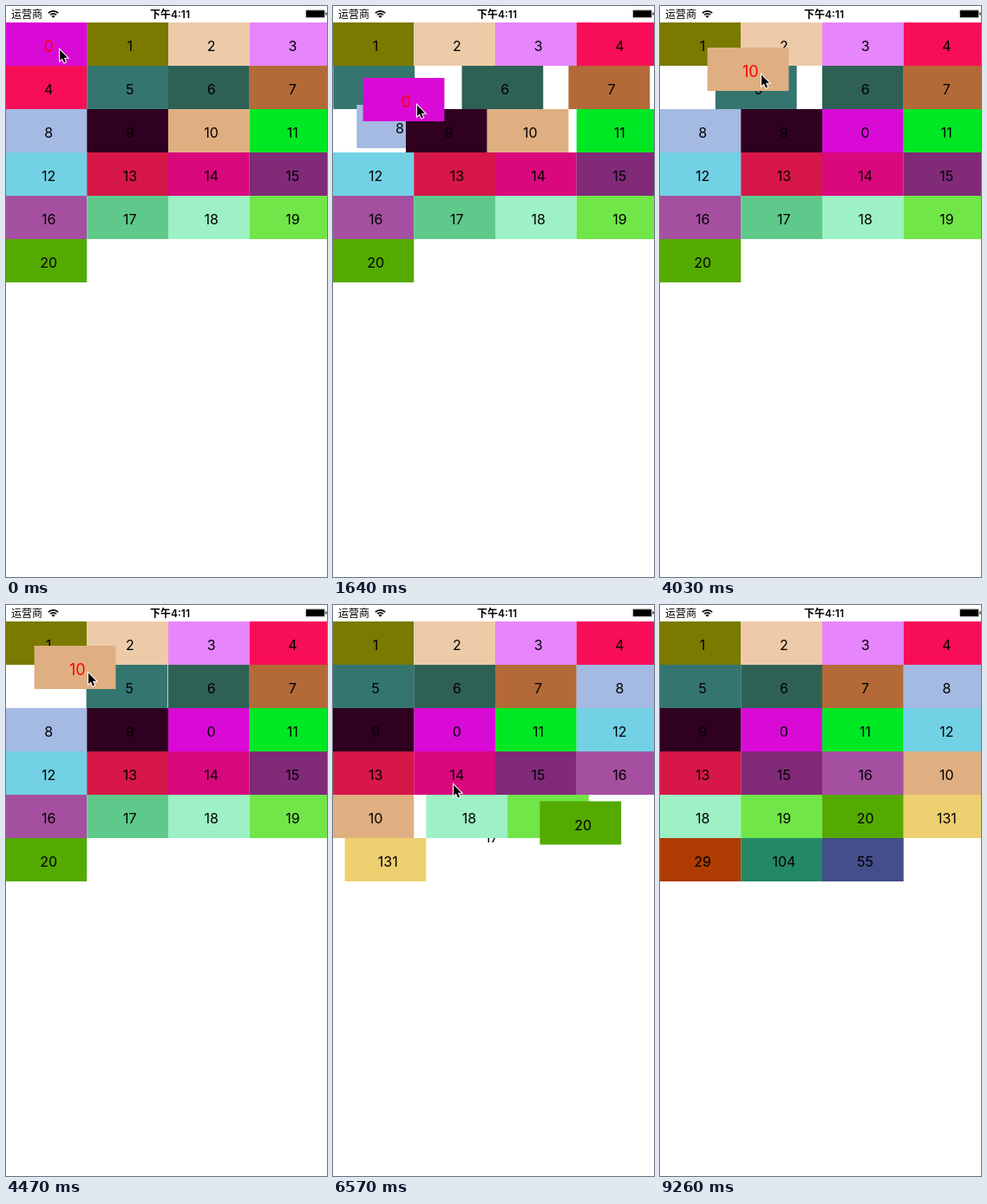
Write an HTML page with a canvas that moves like this. It is 370x659 px and loops after 9560 ms.

```html
<!DOCTYPE html>
<html lang="zh">
<head>
<meta charset="utf-8">
<style>
  html, body { margin: 0; width: 100%; height: 100%; overflow: hidden; background: #fff; }
  canvas { display: block; }
</style>
</head>
<body>
<canvas id="stage" width="370" height="659"></canvas>
<script>
const ctx = document.getElementById('stage').getContext('2d');
const LOOP = 9560, TICK = 149.3, LAST_TICK = 62;
const COLS = 4, W = 93.75, H = 50, TOP = 19, START_COUNT = 21;
const SLIDE = 300 / TICK;
const FONT = 'Inter, "Noto Sans CJK SC", "Noto Sans CJK", sans-serif';

const colors = ('#da0ad6 #7a7a00 #edcba8 #e685fc #f80e58 #34766f #2e6154 #b36a38 #a4bae2 #300020 ' +
  '#dfaf82 #00e824 #72d1e5 #d61748 #d9087d #802a78 #a54fa0 #5fc98b #9df1c4 #70e648 #55aa02 ' +
  '#edd070 #b03c04 #248864 #434e8a').split(' ');
const names = [...Array(START_COUNT).keys(), 131, 29, 104, 55];

// The hand drives everything: [tick, x, y] of the point it holds.
const hand = [
  [0, 47, 44], [4.9, 91, 222], [6.1, 97, 269], [7, 88, 308], [9.38, 233, 119], [11, 82, 108],
  [13, 146, 146], [16, 226, 143], [17, 236, 143], [22, 236, 143], [24, 70, 94], [27, 102, 73],
  [27.5, 108, 58], [28, 95, 72], [30, 80, 72], [31.2, 90, 296], [34, 84, 259], [37, 48, 231],
  [39, 48, 231], [41, 124, 235], [43, 124, 232], [44, 124, 201], [47, 124, 201], [50, 46, 189],
  [53, 46, 189], [54, 40, 185], [59, 40, 185], [62, 500, 732]
];
const drags = [{ start: 0, end: 13 }, { start: 20.95, end: 33.99 }];
const taps = [37.7, 42.5, 45.5, 50.3, 55.6, 58.3];

const clamp = v => Math.max(0, Math.min(1, v));
const ease = v => (1 - Math.cos(Math.PI * clamp(v))) / 2;
const mix = (a, b, p) => a.map((v, i) => v + (b[i] - v) * p);
const slotPos = s => [(s % COLS) * W, TOP + Math.floor(s / COLS) * H];
const slotAt = ([x, y]) => Math.floor((y - TOP) / H) * COLS + Math.floor(x / W);
const cellAt = ([x, y]) => [x - W / 2, y - H / 2];

function handAt(k) {
  const i = hand.findIndex(p => p[0] > k);
  if (i < 0) return hand[hand.length - 1].slice(1);
  const a = hand[i - 1], b = hand[i];
  return mix(a, b, (k - a[0]) / (b[0] - a[0])).slice(1);
}

const items = names.map((name, i) => ({
  name, color: colors[i], born: i < START_COUNT ? -9 : Infinity, dies: Infinity,
  moves: [{ k: -9, from: slotPos(i), to: slotPos(i) }]
}));

function gridPos(item, k) {
  const m = item.moves.filter(v => v.k <= k).pop() || item.moves[0];
  return mix(m.from, m.to, ease((k - m.k) / SLIDE));
}

// Follow the hand once and record every slide, birth and removal.
function plan() {
  let order = [...Array(START_COUNT).keys()];
  let nextTap = 0;

  const reorder = (k, id, slot) => {
    const before = order;
    order = before.filter(v => v !== id);
    if (slot !== undefined) order.splice(slot, 0, id);
    order.forEach((v, s) => {
      if (v !== id && before[s] !== v)
        items[v].moves.push({ k, from: gridPos(items[v], k), to: slotPos(s) });
    });
  };

  const tap = k => {
    const slot = slotAt(handAt(k));
    if (slot % COLS) {
      items[order[slot]].dies = k;
      reorder(k, order[slot]);
    } else {
      const id = items.findIndex(v => v.born === Infinity), p = slotPos(order.length);
      items[id].born = k;
      items[id].moves = [{ k, from: p, to: p }];
      order.push(id);
    }
  };

  for (let n = 0; n <= LAST_TICK * 50; n++) {
    const k = n / 50;
    for (const drag of drags) {
      if (k < drag.start || drag.done) continue;
      const slot = Math.min(slotAt(handAt(k)), order.length - 1);
      if (drag.id === undefined) drag.id = order[slot];
      if (k < drag.end) {
        if (order[slot] !== drag.id) reorder(k, drag.id, slot);
      } else {
        drag.done = true;
        items[drag.id].moves.push({
          k: drag.end, from: cellAt(handAt(drag.end)), to: slotPos(order.indexOf(drag.id))
        });
      }
    }
    if (k >= taps[nextTap]) tap(taps[nextTap++]);
  }
}

function drawCell(item, [x, y], size, held) {
  x += (1 - size) * W / 2 - 0.5;
  y += (1 - size) * H / 2;
  ctx.fillStyle = item.color;
  ctx.fillRect(x, y, W * size, H * size);
  ctx.fillStyle = held ? '#f00' : '#000';
  ctx.font = (held ? 18 : 16) + 'px ' + FONT;
  ctx.textAlign = 'center';
  ctx.fillText(item.name, x + 49.6, y + (held ? 34 : 33.3));
}

function drawStatus() {
  ctx.fillStyle = ctx.strokeStyle = '#000';
  ctx.font = '12px ' + FONT;
  ctx.textAlign = 'left';
  ctx.fillText('运营商', 6, 13.5);
  ctx.font = '600 12px ' + FONT;
  ctx.textAlign = 'center';
  ctx.fillText('下午4:11', 189, 13.5);

  const fan = r => {
    ctx.beginPath();
    ctx.arc(54.5, 13.8, r, -Math.PI * 0.75, -Math.PI * 0.25);
  };
  ctx.lineWidth = 1.7;
  for (const r of [8, 5]) { fan(r); ctx.stroke(); }
  fan(2.8);
  ctx.lineTo(54.5, 13.8);
  ctx.fill();

  ctx.fillRect(346, 5.2, 21, 7.8);
  ctx.fillRect(368.4, 7.5, 1.2, 3);
  ctx.lineWidth = 0.6;
  ctx.strokeStyle = '#888';
  ctx.beginPath();
  ctx.roundRect(345.3, 4.5, 22.4, 9.2, 1.5);
  ctx.stroke();
}

function drawCursor([x, y]) {
  const shape = [[0, 0], [0, 12.6], [2.9, 9.9], [5.1, 14.9], [7, 14], [4.9, 9.2], [9, 9.2]];
  ctx.beginPath();
  shape.forEach(([a, b]) => ctx.lineTo(x + 15 + a, y + 6.5 + b));
  ctx.closePath();
  ctx.lineWidth = 2;
  ctx.strokeStyle = '#fff';
  ctx.stroke();
  ctx.fillStyle = '#000';
  ctx.fill();
}

function draw(k) {
  ctx.fillStyle = '#fff';
  ctx.fillRect(0, 0, 370, 659);
  drawStatus();
  const point = handAt(k);
  // A dropped cell stays on top until it settles.
  const top = drags.find(d => k >= d.start && k < d.end + SLIDE);
  const paint = (item, id) => {
    const size = ease((k - item.born) / SLIDE) - ease((k - item.dies) / SLIDE);
    if (size <= 0) return;
    const held = !!top && top.id === id && k < top.end;
    drawCell(item, held ? cellAt(point) : gridPos(item, k), size, held);
  };
  items.forEach((item, id) => { if (!top || top.id !== id) paint(item, id); });
  if (top) paint(items[top.id], top.id);
  drawCursor(point);
}

plan();
const t0 = performance.now();
function loop() {
  const t = Math.max(0, performance.now() - t0) % LOOP;
  draw(Math.min(LAST_TICK, Math.floor((t + 11) / TICK)));
  requestAnimationFrame(loop);
}
loop();
</script>
</body>
</html>
```
